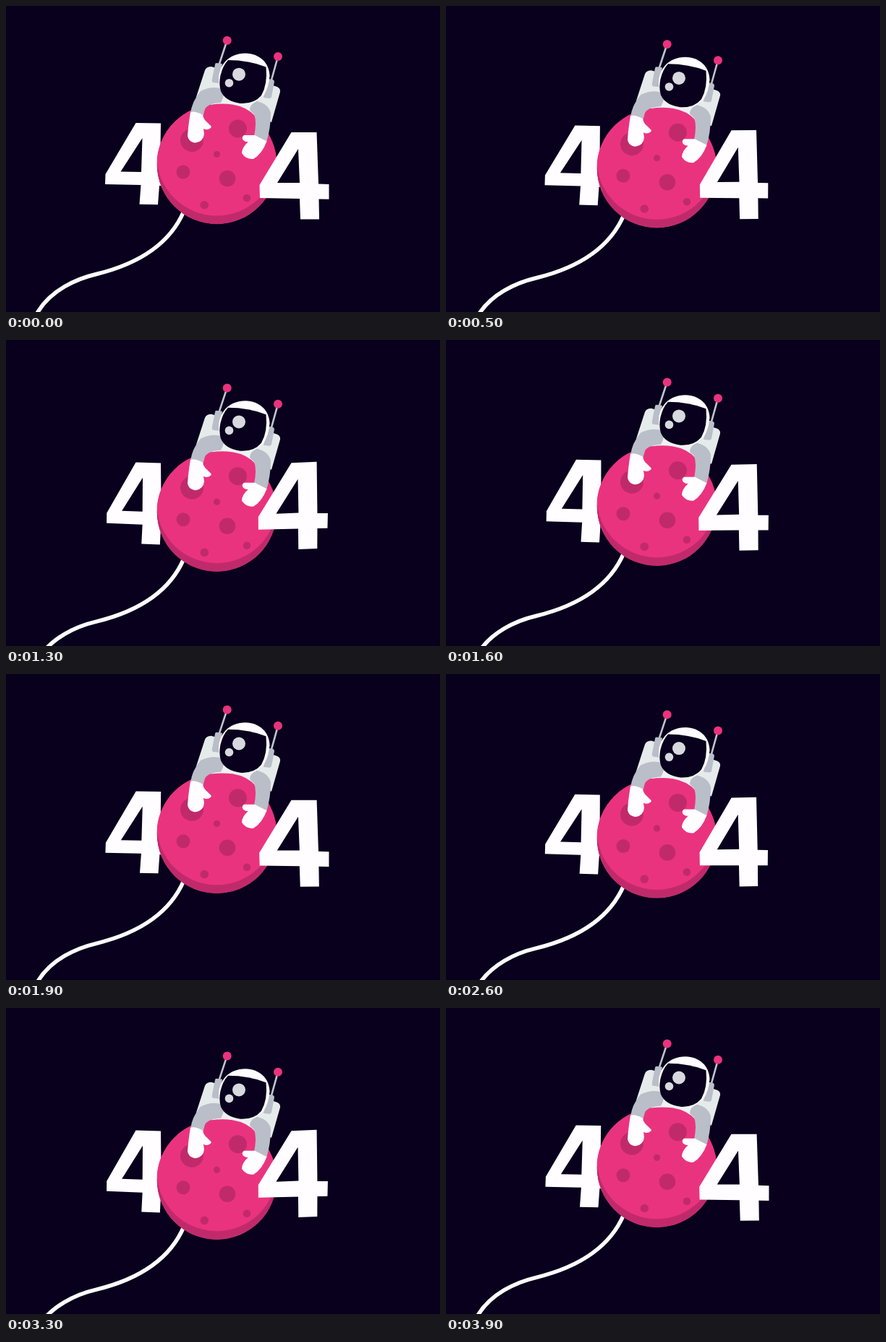
Recreate the animation shown at these times as an HTML page. Size 600x424 px, loop 4000 ms.

```html
<!DOCTYPE html>
<html lang="en">
<head>
<meta charset="utf-8">
<title>404</title>
<style>
  html, body { margin: 0; width: 100%; height: 100%; overflow: hidden; background: #08001c; }
  svg { display: block; width: 600px; height: 424px; }
  .white { fill: #fffdff; }
  .pale { fill: #e5ebea; }
  .chest { fill: #eef2f2; }
  .grey { fill: #b9bec8; }
  .pink { fill: #ea337e; }
  .plum { fill: #c02a6b; }
  .night { fill: #08001c; }
  .shine { fill: #d8d9de; }
  .rope { fill: none; stroke: #fffdff; stroke-width: 5.5; }
  .rod { stroke: #c0c3cd; stroke-width: 2.6; }
</style>
</head>
<body>
<svg viewBox="0 0 600 424">
  <defs>
    <clipPath id="disc"><circle cx="291.4" cy="219.4" r="83"/></clipPath>
  </defs>

  <g class="drift">
    <path class="rope" d="M246 284C227 329 184 357 125 371.5C97 378 62 394 44 424L38 436"/>
  </g>

  <path id="left" class="white" fill-rule="evenodd"
    d="M179.5 162L214 162.5L213 230L226 230.5V250L212 249L210 275.3L184.5 274.8L186.5 248L137 247L137.5 233Z
       M188.5 183L158.5 229.5L187 230Z"/>

  <g class="drift">
    <path class="pale" d="M275 89Q277 84 284 84L372 111Q380 113 379 119L367 161L263 126Z"/>
    <path class="chest" d="M296 112L345 130L344 156L280 150L284 130Z"/>

    <g clip-path="url(#disc)">
      <circle class="plum" cx="291.4" cy="219.4" r="83"/>
      <circle class="pink" cx="291.4" cy="207.5" r="83"/>
    </g>
    <path class="pink" d="M274 152Q275 140 283 137Q297 134.5 313 136.5Q334 140 345 153V166Z"/>
    <g class="plum">
      <circle cx="257" cy="186" r="16"/>
      <circle cx="320.5" cy="170" r="12.5"/>
      <circle cx="291.5" cy="205.5" r="4.6"/>
      <circle cx="245" cy="230" r="9.5"/>
      <circle cx="306" cy="239" r="11.3"/>
      <circle cx="274.3" cy="275.7" r="5.8"/>
      <circle cx="333" cy="266" r="5.3"/>
    </g>

    <path class="grey" d="M269 118Q285 110 299 115Q304 122 297 134Q279 135 275 143L272 154L255 149Q257 132 269 118Z"/>
    <path class="grey" d="M337 144Q337 136 347 132Q362 135 366 148Q366 170 360 189L343 181Q347 160 343 150Z"/>
    <path class="white" d="M255 147Q252 165 251 180Q253 189 262 189.5Q273 188 274 177L273 170Q278 173 283 169Q285 167 282 165L278 161Q273 157 272 151Q262 145 255 147Z"/>
    <path class="white" d="M344 179Q337 179 329 179Q325 182 328 186Q332 189 335 188Q326 196 326 204Q332 213 342 212Q354 205 360.5 187.5Z"/>

    <path class="rod" d="M293 86L305.5 48M366 106L376 70"/>
    <circle class="pink" cx="305.7" cy="47.8" r="6"/>
    <circle class="pink" cx="376" cy="70" r="6"/>
    <path class="grey" d="M291 79L299 80L295 107L286 106Q284 104 285 101L289 81Q289 79 291 79Z"/>
    <path class="grey" d="M363 101L369 102Q371 103 371 105L367 126Q366 128 364 128L356 127Z"/>

    <path class="white" d="M294 104C293 82 308 65.5 331 65.5C351 66 364 79 364.5 97Q363 114 356 124Q345 136 325 135.5Q298 130 294 104Z"/>
    <path class="night" d="M307 75Q336 75 359.5 84.5Q362 108 353 124Q343 136 324 135Q303 132 297 118Q294 108 296.5 96Q300 82 307 75Z"/>
    <circle class="shine" cx="322" cy="94.7" r="9"/>
    <circle class="shine" cx="308.5" cy="106.7" r="5.8"/>
  </g>

  <path id="right" class="white" fill-rule="evenodd"
    d="M394.5 175L429.5 175L432 246.5L446.5 247L446.5 267.8L432.5 267.5L433 295.5L407 295.5L406 267L351 266L350.5 248Z
       M404 198L375 245H406Z"/>
</svg>

<script>
  const PERIOD = 2000, LAG = 135, STEP = 100;
  const left = document.getElementById('left');
  const right = document.getElementById('right');
  const drifters = document.querySelectorAll('.drift');

  // Bob (0..1) and sway (-1..1) share one sine cycle.
  function wave(t) {
    const a = 2 * Math.PI * (t - LAG) / PERIOD;
    return { bob: (1 - Math.cos(a)) / 2, sway: Math.sin(a) };
  }
  const rest = wave(0);

  // Scale and shear around (cx, cy), then shift.
  function pose(el, cx, cy, dx, dy, sx, sy, kx, ky) {
    el.setAttribute('transform',
      `translate(${cx + dx} ${cy + dy}) matrix(${sx} ${ky} ${kx} ${sy} 0 0) translate(${-cx} ${-cy})`);
  }

  function draw(t) {
    const now = wave(t);
    const bob = now.bob - rest.bob, sway = now.sway - rest.sway;
    for (const el of drifters) el.setAttribute('transform', `translate(0 ${21 * bob})`);
    pose(left, 137, 219, 1.5 * bob - 0.8 * sway, 7.6 * bob,
      1, 1 - 0.018 * sway, 0.028 * bob, 0.02 * bob);
    pose(right, 400, 235, -1.5 * bob, -5.8 * bob,
      1 - 0.012 * sway, 1 + 0.016 * sway, -0.026 * bob, -0.047 * bob);
  }

  const start = performance.now();
  function tick() {
    const t = performance.now() - start;
    draw(Math.floor(t / STEP) * STEP % PERIOD);
    requestAnimationFrame(tick);
  }
  tick();
</script>
</body>
</html>
```
